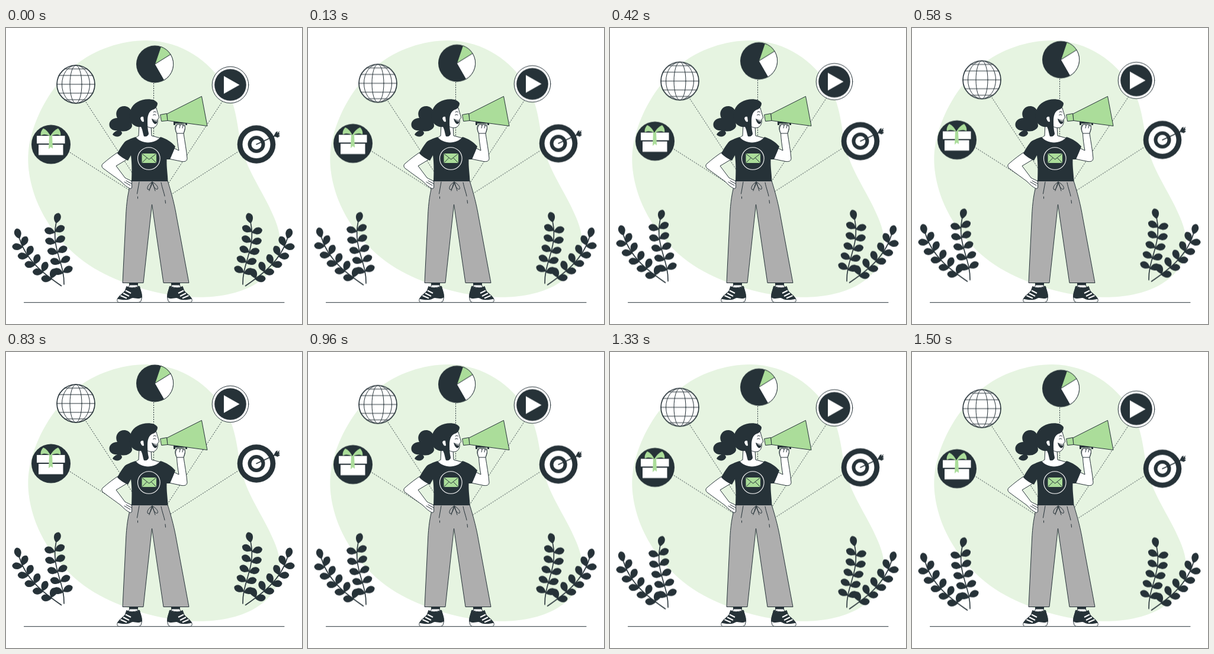
Recreate the animation shown at these times as an HTML page. Size 500 by 500 pixels, loop 1.54 s.

```html
<!DOCTYPE html>
<html lang="en">
<head>
<meta charset="utf-8">
<title>Megaphone</title>
<style>
html, body { margin: 0; width: 100%; height: 100%; overflow: hidden; background: #fff; }
svg { display: block; width: 100vw; height: 100vh; }
.d { fill: #263238; }
.w { fill: #fff; }
.g { fill: #abdd9a; }
.o { stroke: #263238; stroke-width: 1; stroke-linejoin: round; stroke-linecap: round; }
.n { fill: none; }
.bold { stroke-width: 1.6; }
.wl { fill: none; stroke: #fff; stroke-width: 1.1; }
.stripe { stroke-width: 2; }
.pants { fill: #aeaeae; }
.dash { stroke: #263238; stroke-width: 1; stroke-dasharray: 2 2; }
</style>
</head>
<body>
<svg viewBox="0 0 500 500">
  <defs>
    <path id="leaf" class="d" d="M0 0C4 -5 9 -7 13.500 -5.500C17 -4 18.500 -1 18 1C16 5.500 11 6.500 7 5C4 3.500 2 2 0 0Z"/>
    <g id="plant"></g>
    <g id="shoe">
      <path class="d" d="M208 430H223V434H208Z"/>
      <path class="w o" d="M209 434H222L224 440H207Z"/>
      <path class="w o" d="M204 437C210 440 217 439 225 436C227 442 230 449 229.500 455L228 461C227 463 225 463.500 222 463.500H191C188 463.500 187 460 188.500 457C191 452 198 448 201 444Z"/>
      <path class="d" d="M204 436C209 440 218 440 226 436C227 442 230 449 229.500 455C222 460 216 454 211 457C207 460 197 460 188 457.500C191 452 198 448 201 444Z"/>
      <path class="wl stripe" d="M202 443.500L211 448M198 448L208 453M193.500 452L204 456.500"/>
    </g>
  </defs>

  <path fill="#e6f4e1" d="M237 21C298 22 343 56 370 98C393 136 390 178 401 212C413 250 436 280 452 318C472 362 467 405 422 432C390 452 345 456 315 454.500C258 452 203 435 158 411C108 384 70 338 51 290C36 250 34 215 42 185C52 145 75 100 117 63C150 36 195 21 237 21Z"/>
  <path class="o" d="M30.500 463.700H470"/>

  <g id="float">
    <g id="rays" class="dash"></g>
    <use href="#plant"/>
    <use href="#plant" transform="matrix(-1 0 0 1 498 0)"/>

    <g transform="translate(251.500 61)">
      <circle class="d" r="31.500"/>
      <path class="g o" d="M0 0L10 -29.500A31 31 0 0 1 26.500 -16.500Z"/>
      <path class="w o" d="M0 0L26.500 -16.500A31 31 0 0 1 15.500 27Z"/>
    </g>

    <g transform="translate(118 95)">
      <circle class="w" r="32"/>
      <g class="o n">
        <path d="M-32 0H32M-29 -15H29M-29 15H29M-19 -26H19M-19 26H19"/>
        <ellipse rx="10" ry="32"/>
        <ellipse rx="23.500" ry="32"/>
        <circle class="bold" r="32"/>
      </g>
    </g>

    <g transform="translate(379 96)">
      <circle class="w o" r="30.800"/>
      <circle class="d" r="26.800"/>
      <path class="w" d="M-11 -15L15.500 0L-11 15Z"/>
    </g>

    <g transform="translate(76 196.500)">
      <circle class="d" r="33"/>
      <path class="w" d="M-24 -14.500H23.500V-1.500H-24ZM-21 .500H20.500V18H-21Z"/>
      <path class="g" d="M-3 -15H2L3 7L-.500 4.500L-4 8ZM-1 -14C-4 -20 -8 -25 -13 -27C-17 -23 -18 -18 -17 -15C-12 -18 -7 -17 -1 -14ZM-1 -14C2 -20 7 -25 12 -27C16 -23 17 -18 16 -15C11 -18 6 -17 -1 -14Z"/>
    </g>

    <g transform="translate(423 196.500)">
      <circle class="d" r="32.300"/>
      <circle class="w" r="23.500"/>
      <circle class="d" r="14.500"/>
      <circle class="w" r="8.500"/>
      <path class="o bold" d="M0 0L37 -17"/>
      <path class="d" d="M29 -14L33 -21L36 -22L35 -18.500L39 -22.500L38 -18.500L40 -17.500L37 -16L40 -14.500L36 -11.500Z"/>
    </g>
  </g>

  <!-- legs -->
  <path class="pants o" d="M212 258H273C280 280 285 300 288 318L309 430.500H266L246.500 298L232 430.500H197L202.500 318C203.500 295 206 276 212 258Z"/>
  <path class="o n" d="M225 260L221.500 280M222.500 285V288M262 261C264 271 267 278 268 284M269 291L269.500 296M247 260C240 264 237 271 240 273C243 274 246 266 247 260C248 267 253 274 256 272C258 269 253 263 247 260M246 262L242 275M248 262L252 275"/>
  <use href="#shoe"/>
  <use href="#shoe" transform="matrix(-1 0 0 1 502 0)"/>

  <!-- arms -->
  <path class="w o" d="M192 208C182 214 172 222 164 229C161 231 161.500 235 164 237C176 246 186 253 194 259C199 264 204 269 210 271.500L212.500 270V259C208 256 204 255 201 253L186 233L206 221Z"/>
  <path class="o n" d="M200 260L210 266M203 258L212 263"/>
  <path class="w o" d="M272 206L284 203L292 207C290 196 289 188 288.500 178C285 172 285 166 288 163H301C304 167 302 173 300 178C302 192 305 207 306 220C306 225 302 226 297 225.500L275 221Z"/>

  <!-- neck and shirt -->
  <path class="w o" d="M225 162L224 182C220 184 219 186 219 186C226 198 252 198 261 186L246 182L245 166Z"/>
  <path class="d" d="M219 184C211 187 204 189 200 193C195 199 191 206 188 212C193 217 199 221 206 224L211 215C213 230 212.500 246 212 259H273.500C273 246 271 235 271.500 222L277 222C280 215 284 206 286 200C279 192 271 187 261 184C252 196 229 197 219 184Z"/>
  <circle class="wl" cx="241.300" cy="220.500" r="18.800"/>
  <path class="g" d="M229.500 212H254V228H229.500Z"/>
  <path class="o n" d="M230 212.500L241.700 222L253.500 212.500M230 227.500L238 219.500M253.500 227.500L245.500 219.500"/>

  <!-- head -->
  <path class="d" d="M211 139C207 130 194 130 189 137C185 142 186 148 188 152C180 152 174 157 174.500 164C175 170 181 174 188 173C184 175 181 177 180 180C184 185 193 185 196 178C196 176 195 175 194 174C203 176 211 172 213 166Z"/>
  <path class="w o" d="M240 133L254 135C255 140 257 145 258.500 151C258.500 153 256.500 153.500 256 154C257 160 255 166 250 168C246 169.500 239 168 235 164L228 150Z"/>
  <path class="d" d="M256 127C251 118 232 119 222 125C212 130 207 142 209 153C211 163 219 168 228 167C231 172 231 178 233 183C237 184 241 182 241 178C239 171 239 163 239 156C239 147 242 140 248 138C252 137 256 133 256 127Z"/>
  <path class="w" d="M232 150C228 149 226 152 228 155C229 158 231 159 233 158Z"/>
  <path class="o n" d="M249 142Q251 140 253.500 142M248.500 147Q251 145 253 147"/>
  <path class="d" d="M246 153C249 155 253 156 255.500 155.500C256 160 254 163 251 162C248 160 247 157 246 153Z"/>
  <path class="w" d="M248 155Q252 157 255 156.500L254.500 158Q251 158 248 155Z"/>

  <!-- megaphone -->
  <path class="d" d="M283 158H306V164H303V161.500H286V164H283Z"/>
  <path class="g o" d="M272 145L330.500 115.500L340 165.500L273 156.500Z"/>
  <path class="g o" d="M261 146.500L271.500 144.500L273 156.500L263 157.500Z"/>
  <path class="w o" d="M288 165C290 162 293 162 294 165C295 162 298 162 299 165C302 164 303 167 302 171L300 178H288.500C286 173 286 168 288 165Z"/>
  <path class="o n" d="M294 165L293 169M299 165L298 169"/>
</svg>
<script>
const $ = id => document.getElementById(id);
const NS = 'http://www.w3.org/2000/svg';

function add(parent, tag, attrs) {
  const el = document.createElementNS(NS, tag);
  for (const k in attrs) el.setAttribute(k, attrs[k]);
  return parent.appendChild(el);
}

// All rays run towards one point behind the waist.
for (const [x1, y1] of [[108, 210], [135, 125], [249.5, 93], [366, 123], [391, 209.5]])
  add($('rays'), 'line', { x1, y1, x2: 249.5, y2: 300 });

// Leaf pairs sit along a stem, with one leaf at its tip.
function branch(d, from, to, pairs, left, right, tip) {
  const plant = $('plant');
  const stem = add(plant, 'path', { d, class: 'o n bold' });
  const len = stem.getTotalLength();
  const leaf = (at, turn, flip) => {
    const p = stem.getPointAtLength(len * at);
    add(plant, 'use', {
      href: '#leaf',
      transform: `translate(${p.x} ${p.y}) rotate(${turn}) scale(1 ${flip})`
    });
  };
  for (let i = 0; i < pairs; i++) {
    const at = from + (to - from) * i / (pairs - 1);
    leaf(at, left, -1);
    leaf(at + .015, right, 1);
  }
  leaf(1, tip, 1);
}
branch('M93.5 435.500C70 419 35 396 23 356', .18, .86, 5, 184, -68, -107);
branch('M98 433C99 397 76 372 84.500 330', .18, .85, 5, 196, -28, -76);

const low = .6, rise = 10;
$('float').animate(
  [low, low - rise, low].map(y => ({ transform: `translateY(${y}px)` })),
  { duration: 1540, delay: -40, iterations: Infinity }
);
</script>
</body>
</html>
```
